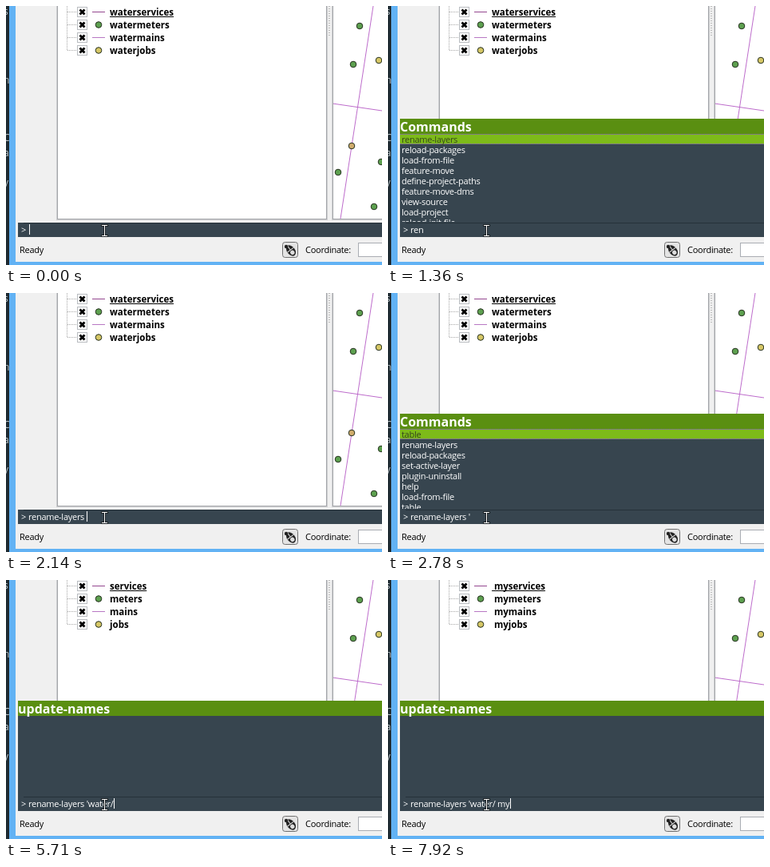
An HTML page with a canvas that plays this animation: 471 px wide and 324 px high, repeating every 8 s.

```html
<!DOCTYPE html>
<html>
<head>
<meta charset="utf-8">
<style>
html, body { margin: 0; width: 100%; height: 100%; overflow: hidden; }
canvas { display: block; }
</style>
</head>
<body>
<canvas id="stage" width="471" height="324"></canvas>
<script>
const ctx = document.getElementById('stage').getContext('2d');
const LOOP = 8000;
const GREEN = '#5da04f', YELLOW = '#d6c766', TAN = '#d0ac6c', PURPLE = '#bd6ccb';

const popups = {
  all: { top: 151, title: 'Commands', items: ['table', 'rename-layers', 'reload-packages',
    'set-active-layer', 'plugin-uninstall', 'help', 'load-from-file', 'table'] },
  re: { top: 141, title: 'Commands', items: ['rename-layers', 'reload-packages', 'load-from-file',
    'feature-move', 'define-project-paths', 'feature-move-dms', 'view-source', 'load-project',
    'reload-init-file'] },
  ren: { top: 162, title: 'Commands', items: ['rename-layers'] },
  none: { top: 151, title: 'Commands', items: [] },
  names: { top: 151, title: 'update-names', items: [] }
};

// start time, typed text, caret shown, popup, layer name prefix
const CMD = 'rename-layers ';
const steps = [
  [0, '', true, null, 'water'],
  [130, '', false, null, 'water'],
  [650, '', true, null, 'water'],
  [740, '', false, 'all', 'water'],
  [1240, 're', false, 're', 'water'],
  [1360, 'ren', false, 're', 'water'],
  [1410, 'ren', false, 'ren', 'water'],
  [1500, 'rena', false, 'ren', 'water'],
  [1650, 'renam', false, 'ren', 'water'],
  [1810, 'rename', false, 'ren', 'water'],
  [2140, CMD, true, null, 'water'],
  [2600, CMD, false, null, 'water'],
  [2750, CMD + "'", false, null, 'water'],
  [2780, CMD + "'", false, 'all', 'water'],
  [3060, CMD + "''", false, 'all', 'water'],
  [3410, CMD + "'", true, 'none', 'water'],
  [3620, CMD + "'w", false, 'names', 'water'],
  [3770, CMD + "'wa", false, 'names', 'water'],
  [3880, CMD + "'wat", false, 'names', 'water'],
  [3990, CMD + "'wate", false, 'names', 'water'],
  [4100, CMD + "'water", true, 'names', 'water'],
  [5710, CMD + "'water/", true, 'names', ''],
  [6710, CMD + "'water/ ", true, 'names', ' '],
  [7580, CMD + "'water/ m", true, 'names', ' m'],
  [7920, CMD + "'water/ my", true, 'names', ' my']
];

function rect(x, y, w, h, color) {
  ctx.fillStyle = color;
  ctx.fillRect(x, y, w, h);
}

function frame(x, y, w, h, fill, border) {
  rect(x, y, w, h, border);
  rect(x + 1, y + 1, w - 2, h - 2, fill);
}

function line(x1, y1, x2, y2, color, width = 1, dash = []) {
  ctx.strokeStyle = color;
  ctx.lineWidth = width;
  ctx.setLineDash(dash);
  ctx.beginPath();
  ctx.moveTo(x1, y1);
  ctx.lineTo(x2, y2);
  ctx.stroke();
  ctx.setLineDash([]);
}

function dot(x, y, color) {
  ctx.beginPath();
  ctx.arc(x, y, 3.8, 0, 7);
  ctx.fillStyle = color;
  ctx.fill();
  ctx.strokeStyle = '#25301f';
  ctx.lineWidth = 1;
  ctx.stroke();
}

function ellipse(x, y, rx, ry, color) {
  ctx.beginPath();
  ctx.ellipse(x, y, rx, ry, 0, 0, 7);
  ctx.fillStyle = color;
  ctx.fill();
}

function text(str, x, y, color, font = '11px', spacing = -0.27) {
  ctx.font = font + ' "Open Sans", "Noto Sans", sans-serif';
  ctx.letterSpacing = spacing + 'px';
  ctx.fillStyle = color;
  ctx.fillText(str, x, y);
  return ctx.measureText(str).width;
}

function clipped(x, y, w, h, draw) {
  ctx.save();
  ctx.beginPath();
  ctx.rect(x, y, w, h);
  ctx.clip();
  draw();
  ctx.restore();
}

function drawWindow() {
  rect(0, 0, 471, 324, '#62b2f4');
  rect(0, 0, 4, 324, '#1e2a31');
  clipped(0, 0, 4, 324, () => {
    [['s', 11], ['n', 97], ['C', 169], ['a', 188], ['y', 225]].forEach(
      ([ch, y]) => text(ch, -3, y, '#c3ccd0', '12px'));
  });
  rect(12, 0, 459, 320, '#f0f0f0');
  [[63, 340], [408, 70]].forEach(([x, w]) => {
    frame(x, -2, w, 270, '#fff', '#cfd0d2');
    frame(x + 1, -1, w - 2, 268, '#fff', '#a3a5a9');
  });
  for (let y = 0; y < 38; y += 3) rect(404, y, 2, 1, '#bdbdbd');
}

function drawMap() {
  clipped(410, 0, 61, 266, () => {
    line(460, 0, 419, 266, PURPLE);
    line(409, 122, 471, 131, PURPLE);
    [[443, 25], [435, 73], [416, 208], [470, 195], [461, 251]].forEach(([x, y]) => dot(x, y, GREEN));
    dot(467, 68, YELLOW);
    dot(433, 175, TAN);
  });
}

function drawLayers(prefix) {
  line(76.5, 0, 76.5, 56, '#a8a8a8', 1, [1, 1]);
  ['services', 'meters', 'mains', 'jobs'].forEach((name, i) => {
    const y = 7.5 + i * 16;
    line(77, y, 89, y, '#a8a8a8', 1, [1, 1]);
    frame(89, y - 6.5, 13, 13, '#fff', '#b9bcc0');
    line(92.5, y - 3, 98.5, y + 3, '#000', 2.8);
    line(98.5, y - 3, 92.5, y + 3, '#000', 2.8);
    if (i === 1) dot(116, y, GREEN);
    else if (i === 3) dot(116, y, YELLOW);
    else line(108, y, 124, y, i ? '#b878c4' : '#94478f');
    const width = text(prefix + name, 130, y + 4.5, '#000', 'bold 11.5px', 0);
    if (!i) rect(130, y + 5.5, width, 1, '#000');
  });
}

function drawPopup({ top, title, items }) {
  rect(15, top, 456, 271 - top, '#37454f');
  rect(15, top, 456, 19, '#5a8f11');
  text(title, 15, top + 16, '#fff', 'bold 16px', 0);
  clipped(15, top, 456, 270 - top, () => {
    if (items.length) {
      rect(15, top + 19, 456, 13, '#7dbb19');
      [19.5, 31.5].forEach(dy => line(15, top + dy, 471, top + dy, '#8244e6', 1, [1, 1]));
    }
    items.forEach((item, i) =>
      text(item, 17, top + 30 + i * 13, i ? '#fff' : '#34451d'));
  });
}

function drawPrompt(typed, caret) {
  rect(15, 271, 456, 18, '#37454f');
  rect(22, 271, 449, 1, '#26323a');
  text('>', 19, 284, '#fff');
  const width = text(typed, 28, 284, '#fff');
  if (caret) rect(Math.round(28.5 + width), 273, 1, 13, '#fff');
}

function drawStatus() {
  text('Ready', 17, 309, '#000');
  text('Coordinate:', 375, 309, '#000');
  frame(441, 296, 40, 18, '#fff', '#aaadb3');
  ctx.beginPath();
  ctx.roundRect(346.5, 295.5, 19, 19, 3);
  ctx.fillStyle = '#e4e4e4';
  ctx.fill();
  ctx.strokeStyle = '#707070';
  ctx.lineWidth = 1;
  ctx.stroke();
  ctx.save();
  ctx.translate(357, 306);
  ctx.rotate(-0.65);
  ellipse(0, 0, 5, 7.5, '#222');
  ellipse(0, 3, 2.6, 2.8, '#ddd');
  line(-5, -1, 5, -1, '#ddd');
  line(0, -7, 0, -1, '#ddd');
  ctx.restore();
  ellipse(351, 301, 2.2, 2.2, '#222');
}

function drawPointer() {
  [['#1c2226', 1], ['#fff', 0]].forEach(([color, edge]) => {
    rect(120 - edge, 274 - edge, 7 + 2 * edge, 1 + 2 * edge, color);
    rect(120 - edge, 287 - edge, 7 + 2 * edge, 1 + 2 * edge, color);
    rect(123 - edge, 274, 1 + 2 * edge, 14, color);
  });
}

function render() {
  const t = performance.now() % LOOP;
  const [, typed, caret, popup, prefix] = steps.findLast(step => step[0] <= t);
  drawWindow();
  drawMap();
  drawLayers(prefix);
  if (popup) drawPopup(popups[popup]);
  drawPrompt(typed, caret);
  drawStatus();
  drawPointer();
  requestAnimationFrame(render);
}
render();
</script>
</body>
</html>
```
